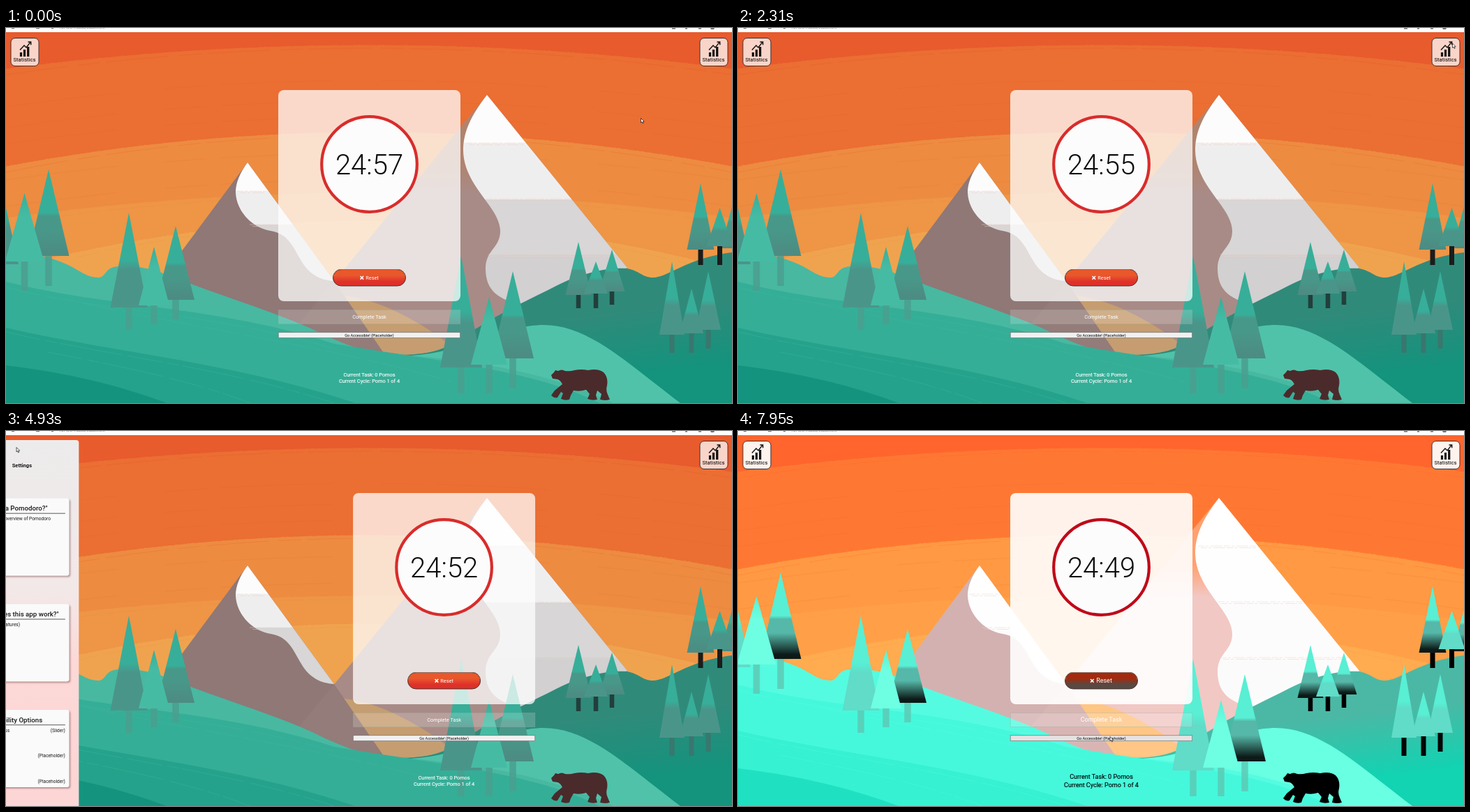
Recreate the animation shown at these times as an HTML page. Size 1040x538 px, loop 8 s.

```html
<!DOCTYPE html>
<html lang="en">
<head>
<meta charset="utf-8">
<title>Pomodoro timer</title>
<style>
html, body { margin: 0; width: 100%; height: 100%; overflow: hidden; }
svg {
  display: block; width: 100vw; height: 100vh; font-family: Roboto, Arial, sans-serif;
  --sky0: #e85b2d; --sky1: #eb6e33; --sky2: #ed8b41; --sky3: #ee9546; --sky4: #f0a34e;
  --peakL: #8f7876; --peakT: #b1836e; --peakR: #a88b86; --tan: #c59d70;
  --snow0: #fcfcfc; --snow1: #efeeef; --snow2: #d8d6d6; --snow3: #d2d0d1;
  --hill0: #48b8a1; --hill1: #35ae97; --hill2: #25a28b; --hill3: #14947e;
  --dark0: #308a7a; --dark1: #14937d; --pale: #50c2aa;
  --tree0: #37ae99; --tree1: #489889; --tree2: #4c8c83; --soft: #4a958a; --light: #46bba4;
  --trunkA: #4b9f90; --trunkB: #223f3c; --trunkC: #1b1c1c; --trunkD: #39776f;
  --bear: #4b2a2b; --ring: #d92c2c; --card: rgba(255,255,255,.74); --btn: rgba(255,255,255,.74);
  --reset0: #e9582b; --reset1: #de302a; --bar: #f1f0f0; --ink: #fff; --size: 7.35px;
}
svg.hc {
  --sky0: #ff652c; --sky1: #ff7833; --sky2: #ff9943; --sky3: #ffa048; --sky4: #ffab50;
  --peakL: #d3b1b0; --peakT: #ffa070; --peakR: #f1c8c4; --tan: #ffc685;
  --snow0: #fff; --snow1: #fefefe; --snow2: #fdfcfc; --snow3: #fcfbfb;
  --hill0: #55fbe0; --hill1: #45f8dc; --hill2: #36f1d2; --hill3: #1fe1c2;
  --dark0: #4bb8a5; --dark1: #12d3b2; --pale: #68ffe2;
  --tree0: #58efd4; --tree1: #56b8a9; --tree2: #0c1a18; --soft: #60dcc8; --light: #6effe2;
  --trunkA: #5ccab5; --trunkB: #000; --trunkC: #000; --trunkD: #020606;
  --bear: #000; --ring: #bf0a1a; --card: rgba(255,255,255,.9); --btn: rgba(255,255,255,.92);
  --reset0: #a32a0e; --reset1: #584943; --bar: #e6e2e2; --ink: #000; --size: 9px;
}
.label { font-size: var(--size); fill: #fff; }
.info { font-size: var(--size); fill: var(--ink); stroke: var(--ink); stroke-width: .15; }
.hc #task { transform: translateY(-1px); }
.hc #cycle { transform: translateY(1.5px); }
.hc #cross { transform: translateX(-2.5px); }
</style>
</head>
<body>
<svg id="stage" viewBox="0 0 1040 538" preserveAspectRatio="none"></svg>
<script>
const stage = document.getElementById('stage');

const text = (x, y, s, size, anchor = 'start', weight = 400) =>
  `<text x="${x}" y="${y}" font-size="${size}" text-anchor="${anchor}" font-weight="${weight}">${s}</text>`;

const path = (d, fill, more = '') => `<path d="${d}" fill="${fill}" ${more}/>`;

// stops: [colour, offset] pairs
const gradient = (id, stops, dir = 'x2="0" y2="1"') =>
  `<linearGradient id="${id}" ${dir}>` + stops.map(([c, o]) =>
    `<stop offset="${o}" style="stop-color:var(--${c})"/>`).join('') + '</linearGradient>';

// arch across the whole sky
const arch = (side, top) => `M0,${side}Q520,${2 * top - side} 1040,${side}`;

function sky() {
  let s = '<rect y="6" width="1040" height="532" fill="var(--sky0)"/>';
  [[58, 24], [198, 149], [272, 236], [346, 276]].forEach(([side, top], i) => {
    s += path(arch(side, top) + 'V538H0Z', `var(--sky${i + 1})`);
    s += path(arch(side, top), 'none', `stroke="var(--sky${i})" stroke-dasharray="7 2 15 3 3 4"`);
    s += path(arch(side + 9, top + 5), 'none',
      `stroke="var(--sky${i})" stroke-width=".7" stroke-dasharray="90 14 33 8" opacity=".6"`);
  });
  for (const y of [75, 105, 128, 180, 218])
    s += path(arch(y + 38, y), 'none', 'stroke="#d95a20" stroke-width=".8" stroke-dasharray="160 70 60 20" opacity=".16"');
  return s;
}

function mountains() {
  const left = 'M346,193L196,395 420,480 552,474 470,363Z';
  const right = 'M689,96L400,449 545,480 900,420 890,344Z';
  const snowL = 'M346,193C335,208 329,222 329,236C330,263 353,287 379,291C405,295 412,316 423,334C434,353 450,362 470,363Z';
  const snowR = 'M689,96C665,127 655,150 655,176C656,227 707,256 708,291C708,316 687,318 687,345C687,372 700,388 735,396L890,344Z';
  const edge = (x1, x2, y) => path(`M${x1},${y}H${x2}M${x1 + 4},${y + 2.5}H${x2 - 2}`, 'none',
    'stroke="#e9cfc8" stroke-width=".8" stroke-dasharray="9 2 4 3 17 2" opacity=".6"');
  return path(left, 'var(--peakL)') + path(right, 'url(#rock)') +
    path('M484,384C540,390 600,425 645,462L545,472Z', 'var(--tan)') +
    path('M470,363L400,449 545,472Z', 'var(--peakL)', 'opacity=".8"') +
    path(snowL, 'url(#snowL)') + edge(331, 372, 234) + edge(349, 410, 282) +
    path(snowR, 'url(#snowR)') + edge(659, 744, 165) + edge(688, 810, 245) + edge(691, 874, 325);
}

function hills() {
  return path('M500,538L545,468C600,472 632,462 660,440C705,410 745,392 790,369C820,354 858,343 889,345C906,347 911,358 927,358C950,357 975,330 1040,322V538Z', 'url(#dark)') +
    path('M560,538L580,470C660,465 710,426 770,426C835,426 890,481 966,538Z', 'var(--pale)') +
    path('M0,318C40,322 70,330 95,343C112,353 120,358 133,358C144,357 141,343 161,342C195,339 225,351 262,366C330,392 400,412 455,440C490,456 520,467 553,468C690,477 790,500 870,538H0Z', 'var(--hill0)') +
    path('M0,364C150,402 300,398 470,453C620,478 755,490 850,538H0Z', 'var(--hill1)') +
    path('M0,430C150,465 330,480 500,538H0Z', 'var(--hill2)') +
    path('M0,484C90,495 160,512 230,538H0Z', 'var(--hill3)') +
    path('M0,372C150,410 300,408 470,460M0,436C150,471 310,486 470,538M60,465C190,490 270,508 350,538M110,395C270,430 480,460 640,508', 'none',
      'stroke="var(--hill0)" stroke-width=".8" stroke-dasharray="50 7 18 4 90 9" opacity=".45"');
}

// each tree: centre, tip, foot, half width, trunk end
const tree = ([x, tip, foot, w, end, fill = 'tree'], trunk, tw) =>
  `<rect x="${x - tw / 2}" y="${foot - 1}" width="${tw}" height="${end - foot + 1}" fill="var(--${trunk})" opacity="${trunk == 'trunkA' ? .85 : 1}"/>` +
  path(`M${x},${tip}L${x + w},${foot}H${x - w}Z`, `url(#${fill})`);

const grove = (trunk, tw, trees) => trees.map(t => tree(t, trunk, tw)).join('');

function trees() {
  return grove('trunkA', 9.5, [
    [-11, 208, 339, 29, 365, 'softTree'], [61, 203, 327, 29.5, 370], [26.5, 237, 335, 28, 377, 'lightTree'],
    [243, 284, 390, 27, 418], [176, 265, 401, 26.5, 433, 'softTree'], [212, 314, 398, 22, 425, 'lightTree'],
    [726, 349, 474, 30, 517], [652, 327, 487, 30, 524, 'softTree'], [692, 386, 483, 26, 524, 'lightTree']]) +
    grove('trunkB', 6.5, [[868, 318, 378, 18.5, 397], [820, 307, 383, 18.5, 402], [845, 335, 381, 17, 402, 'softTree']]) +
    grove('trunkC', 7, [[1046, 234, 316, 22, 330], [995, 223, 318, 19.5, 340], [1022.5, 258, 313, 19, 340, 'softTree']]) +
    grove('trunkD', 7, [[1006, 349, 433, 18, 460, 'softTree'], [954, 335, 440, 18, 466, 'softTree'], [982, 374, 438, 17, 466, 'softTree']]);
}

const bear = path('M781,498L785,494 787,491 791,492Q796,489 801,492Q808,493 814,491Q824,489 834,491Q848,488 856,494Q863,501 861,513Q859,520 862,526L865,533Q859,535 851,533L853,525 847,520 845,527 847,533Q840,535 833,532L836,525 831,519Q822,522 813,520L809,527 807,533Q801,535 795,532L798,524 795,522 790,530Q786,532 781,527L786,520 797,511Q794,505 790,504L783,503Z', 'var(--bear)');

const statButton = x => `<g transform="translate(${x},0)">
  <rect x="7" y="14.5" width="40" height="40" rx="6" fill="var(--btn)" stroke="#40302c"/>
  <path d="M21.5,41V35M26.5,41V31M31.7,41V27" stroke="#111" stroke-width="3.2"/>
  <path d="M20,31.5L26,25 29,28 35,20.5M31.5,20H35.7V24.2" stroke="#111" stroke-width="1.4" fill="none"/>
  ${text(26.5, 47.8, 'Statistics', 7.7, 'middle')}</g>`;

function panel(id, title, titleY, closeX, cards) {
  const inner = cards.map(([top, h, head, gap, rows]) =>
    `<rect x="14" y="${top}" width="135" height="${h}" rx="3" fill="#fafafa" filter="url(#shadow)"/>` +
    path(`M19.5,${top + 21.7}H143.5`, 'none', 'stroke="#333" stroke-width=".8"') +
    text(19.5, top + 17.7, head, 9.7, 'start', 500) +
    rows.map(([a, b = ''], i) => text(19.5, top + 31.5 + i * gap, a, 6.6) +
      text(143.5, top + 31.5 + i * gap, b, 6.6, 'end')).join('')).join('');
  return `<g id="${id}" fill="#181818"><rect y="13" width="163" height="540" rx="4" fill="url(#panelFill)"/>
    ${text(81.5, titleY, title, 7.6, 'middle', 700)}
    <circle cx="${closeX}" cy="24.5" r="5.6" fill="#eee" stroke="#111" stroke-width="1.2"/>
    <path d="M${closeX - 2.5},22l5,5m0,-5l-5,5" stroke="#111" stroke-width="1.2"/>${inner}</g>`;
}

const timer = `<g id="timer">
  <rect x="390" y="89" width="261" height="303" rx="8" fill="var(--card)"/>
  <circle cx="520.5" cy="195.5" r="68.3" fill="#fcfcfc" stroke="var(--ring)" stroke-width="4.2"/>
  <text id="clock" x="520.5" y="210" font-size="40" font-weight="300" text-anchor="middle" fill="#0c0c0c"></text>
  <rect x="468.5" y="346.5" width="104" height="23.5" rx="11.7" fill="url(#reset)" stroke="#47302c"/>
  <path d="M469,357Q470,346.7 480,346.5H561Q571,346.7 572,357" fill="none" stroke="#8c6a5c"/>
  <path id="cross" d="M507.5,356l4.6,4.6m0,-4.6l-4.6,4.6" stroke="#fff" stroke-width="1.5"/>
  <text class="label" x="524.5" y="361" text-anchor="middle">Reset</text>
  <rect x="390.2" y="404.5" width="260.5" height="20" fill="#fff" fill-opacity=".18" stroke="#8fb0a4" stroke-opacity=".5" stroke-width=".7"/>
  <text class="label" x="520.5" y="416.9" text-anchor="middle">Complete Task</text>
  <rect x="390.2" y="436.8" width="260.5" height="7.8" fill="var(--bar)" stroke="#666" stroke-width=".6"/>
  ${text(520.5, 442.7, 'Go Accessible! (Placeholder)', 5.5, 'middle')}
  <text id="task" class="info" x="520.5" y="500.2" text-anchor="middle">Current Task: 0 Pomos</text>
  <text id="cycle" class="info" x="520.5" y="509" text-anchor="middle">Current Cycle: Pomo 1 of 4</text></g>`;

const browserBar = `<rect width="1040" height="6" fill="#fdfdfd"/><g fill="#777">${text(76, .8, '127.0.0.1:5500/index.html', 5.6)}
  <path d="M8,0h4v1h-4zM43,0h5v1h-5zM65,0h3v1h-3zM954,0h5v1.5h-5zM973,0h3v1.5h-3zM992,0h4v1.5h-4zM1009,0h6l-1,2h-4z"/></g>`;

stage.innerHTML = `<defs>
  ${gradient('tree', [['tree0', 0], ['tree0', .5], ['tree1', .54], ['tree1', .7], ['tree2', .95], ['tree2', 1]])}
  ${gradient('softTree', [['tree0', 0], ['tree0', .5], ['soft', .6], ['soft', 1]])}
  ${gradient('lightTree', [['tree0', 0], ['light', .35], ['light', 1]])}
  ${gradient('snowL', [['snow0', .24], ['snow1', .24], ['snow1', .525], ['snow2', .525]])}
  ${gradient('snowR', [['snow0', .23], ['snow1', .23], ['snow1', .5], ['snow2', .5], ['snow2', .765], ['snow3', .765]])}
  ${gradient('rock', [['peakT', 0], ['peakT', .25], ['peakR', .37], ['peakR', 1]])}
  ${gradient('dark', [['dark0', 0], ['dark0', .55], ['dark1', .95]], 'x2=".3" y2="1"')}
  ${gradient('reset', [['reset0', 0], ['reset0', .35], ['reset1', .75]])}
  <linearGradient id="panelFill" x2="0" y2="1"><stop stop-color="#ecebeb"/><stop offset=".4" stop-color="#f3e8e8"/><stop offset=".6" stop-color="#fcd8d7"/><stop offset="1" stop-color="#fcd5d5"/></linearGradient>
  <filter id="shadow"><feDropShadow dx="1.8" dy="1.8" stdDeviation="1" flood-color="#7a4a4a" flood-opacity=".55"/></filter></defs>
  ${sky()}${mountains()}${hills()}${trees()}${bear}${timer}${statButton(0)}${statButton(987)}
  ${panel('stats', 'User Statistics', 43, 152, [
    [68, 111, 'Today', 36.5, [['Pomos cycles:', '3 po.'], ['Distractions:', '19'], ['Total Tasks:', '0 tasks']]],
    [200.5, 111, 'Totals', 24.4, [['Pomos cycles:', '3 po.'], ['Avg. Distractions:', '13.00 per po.'], ['Best Day:', '3 po. | 75.00 min.'], ['Total Tasks:', '0 tasks']]],
    [333, 187, 'Overview', 0, [['graph']]]])}
  ${panel('settings', 'Settings', 52, 11, [
    [96.5, 111, '"What is a Pomodoro?"', 0, [['Explanation/overview of Pomodoro']]],
    [248.3, 111, '"How does this app work?"', 0, [['Functions (features)']]],
    [400, 111, 'Accessibility Options', 36.6, [['Site Brightness', '(Slider)'], ['(Placeholder)', '(Placeholder)'], ['(Placeholder)', '(Placeholder)']]]])}
  ${browserBar}
  <path id="cursor" d="M0,0V6.4L1.5,5.1 2.6,7.5 3.7,7 2.7,4.7H4.7Z" fill="#fff" stroke="#111" stroke-width=".7"/>`;

const $ = id => document.getElementById(id);
const move = (id, x, y = 0) => $(id).setAttribute('transform', `translate(${x},${y})`);
const clamp = x => Math.min(1, Math.max(0, x));

// cubic-bezier(.25, .1, .25, 1)
function ease(x) {
  let a = 0, b = 1, s;
  for (let i = 0; i < 20; i++) {
    s = (a + b) / 2;
    if (.75 * s * (1 - s) + s ** 3 < x) a = s; else b = s;
  }
  return .3 * s * (1 - s) ** 2 + 3 * s * s * (1 - s) + s ** 3;
}

// openness of a panel that opens and closes over half a second
const openness = (t, open, close) =>
  t < close ? ease(clamp((t - open) / 500)) : 1 - ease(clamp((t - close) / 500));

// time, x, y of the pointer tip
const route = [[0, 909.5, 129.5], [140, 909.5, 129.5], [820, 1016, 36], [1050, 1016, 36], [1600, 1021.5, 20.5],
  [2312, 1023.5, 22], [2450, 1023.5, 22], [3350, 33, 44], [3600, 25.5, 38], [3850, 25.5, 38],
  [4650, 15, 23.5], [4900, 15, 23.5], [5600, 218, 126], [6750, 533, 438.5], [8000, 533, 438.5]];

function pointer(t) {
  const i = Math.max(1, route.findIndex(p => p[0] > t));
  const [t0, x0, y0] = route[i - 1], [t1, x1, y1] = route[i];
  const u = (t - t0) / (t1 - t0), k = u * u * (3 - 2 * u);
  return [x0 + (x1 - x0) * k, y0 + (y1 - y0) * k];
}

function draw(now) {
  const t = Math.floor((now % 8000 + 30) / 136) * 136;
  const right = openness(t, 900, 1790), left = openness(t, 3595, 4792);
  move('stats', 1075 - 203 * right);
  move('settings', -198 + 203 * left);
  move('timer', 156 * (left - right));
  move('cursor', ...pointer(t));
  $('clock').textContent = '24:' + (57 - Math.floor((t + 180) / 1000));
  stage.classList.toggle('hc', t >= 7700);
}

const start = performance.now();
function loop() {
  draw(performance.now() - start);
  requestAnimationFrame(loop);
}
loop();
</script>
</body>
</html>
```
